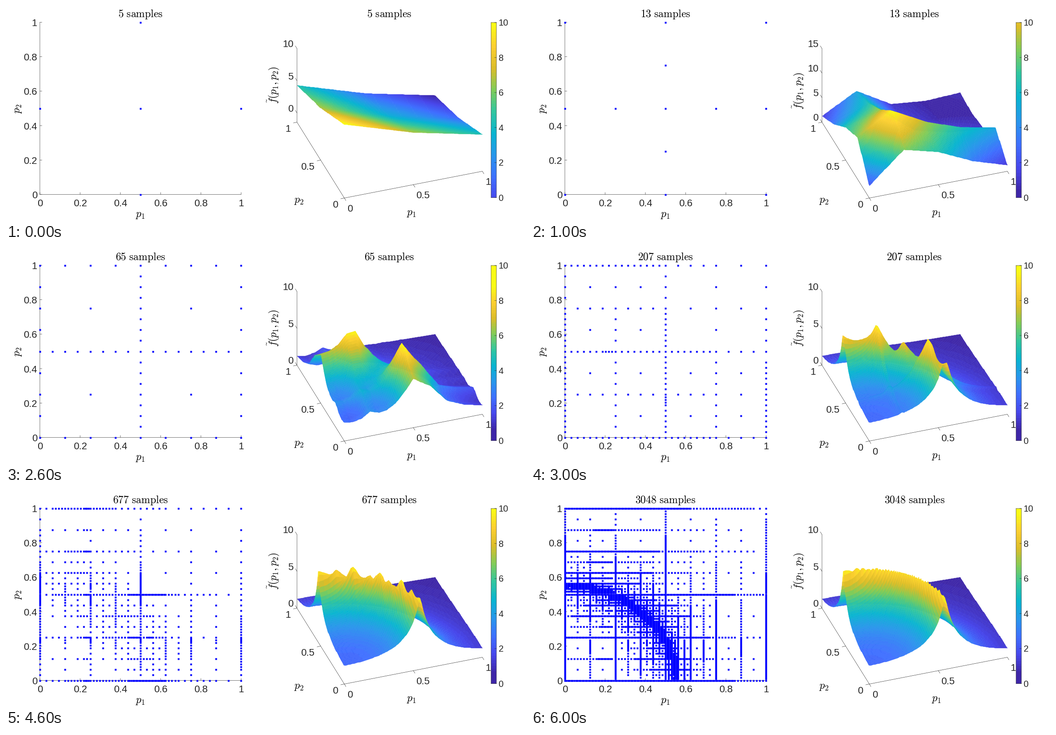
Animation of 1162 by 482 pixels, one loop 7 s. Source, as a matplotlib script:

```python
import numpy as np
import matplotlib.pyplot as plt
from matplotlib.animation import ArtistAnimation
from matplotlib.colors import LinearSegmentedColormap

W, H, DPI = 1162, 482, 64
INK = (0.15, 0.15, 0.15)
plt.rcParams["font.family"] = "Liberation Sans"
plt.rcParams["mathtext.fontset"] = "cm"

PARULA = LinearSegmentedColormap.from_list("parula", [
    (.242, .150, .660), (.280, .278, .922), (.244, .436, .999),
    (.154, .590, .922), (.030, .708, .816), (.194, .776, .625),
    (.504, .799, .348), (.863, .741, .160), (.989, .814, .189),
    (.977, .984, .081)], N=64)

# ---- adaptive sparse grid on nodes k / N ----
FINEST = 7
N = 2 ** FINEST
NODES = np.arange(N + 1)


def node_level(k):
    if k == N // 2:
        return 0
    return 1 if k % N == 0 else FINEST + 1 - (k & -k).bit_length()


def node_parent(k):
    lev = node_level(k)
    if lev < 2:
        return N // 2
    h = N >> lev
    return k - h if node_level(k - h) == lev - 1 else k + h


LEVEL = np.array([node_level(int(k)) for k in NODES])
PARENT = np.array([node_parent(int(k)) for k in NODES])


def model(x, y):
    return 1 / (np.abs(0.3 - x ** 2 - y ** 2) + 0.1)


def detail(f):
    """Along axis 0: each node's value minus its coarser interpolant."""
    out = f.copy()
    for k, lev in enumerate(LEVEL):
        if lev == 1:
            out[k] -= f[N // 2]
        elif lev > 1:
            h = N >> lev
            out[k] -= (f[k - h] + f[k + h]) / 2
    return out


def hats(x):
    h = np.maximum(0, 1 - np.abs(x[:, None] - NODES / N) * 2.0 ** LEVEL)
    h[:, LEVEL == 0] = 1
    return h


SURPLUS = detail(detail(model(NODES[:, None] / N, NODES / N)).T).T
WEIGHT = np.abs(SURPLUS)
DEPTH = LEVEL[:, None] + LEVEL


def include(used, a, b):
    """Add a node together with all of its ancestors."""
    if not used[a, b]:
        used[a, b] = True
        include(used, PARENT[a], b)
        include(used, a, PARENT[b])


def grow(used, depth, count):
    """Refine below the largest surplus until count samples are used."""
    used = used.copy()
    include(used, N // 2, N // 2)
    while used.sum() < count:
        weight = np.where(used, WEIGHT, -1)
        score = np.maximum(weight[PARENT], weight[:, PARENT])
        score[used | (DEPTH > depth)] = -2
        include(used, *np.unravel_index(score.argmax(), score.shape))
    return used


# ---- drawing, all in pixel coordinates ----
fig = plt.figure(figsize=(W / DPI, H / DPI), dpi=DPI, facecolor="white")
ax = fig.add_axes([0, 0, 1, 1])
ax.axis("off")


def pt(px):
    return px * 72 / DPI


def seg(x0, y0, x1, y1, z=1):
    return ax.plot([x0, x1], [y0, y1], color=INK, lw=pt(.65), zorder=z,
                   snap=False)[0]


def label(x, y, s, size=22, ha="center"):
    return ax.text(x, y + .36 * size, s, fontsize=pt(size), color=INK,
                   ha=ha, va="baseline")


def tex(x, y, s, va="baseline", **kw):
    return ax.text(x, y, s, fontsize=pt(23.7), color="black",
                   ha="center", va=va, **kw)


def flat(x, y):
    return 75.4 + 450.4 * x, 422 - 386 * y


def project(x, y, h=0):
    return 757 + 309 * x - 106 * y, 430 - 60 * x - 170 * y - 165 * h


def draw_axes():
    seg(*flat(0, 0), *flat(0, 1))
    seg(*flat(0, 0), *flat(1, 0))
    for v in np.linspace(0, 1, 6):
        x, y = flat(v, v)
        x0, y0 = flat(0, 0)
        seg(x, y0, x, y0 - 4.5)
        seg(x0, y, x0 + 4.5, y)
        label(x, 441, f"{v:g}")
        label(69.5, y + .5, f"{v:g}", ha="right")
    tex(300.5, 472, "$p_1$")
    tex(27, 229, "$p_2$", rotation=90, va="center")

    seg(*project(0, 0), *project(1, 0))
    seg(*project(0, 0), *project(0, 1))
    seg(*project(0, 1), *project(0, 1, 1))
    for v in (0, .5, 1):
        x, y = project(v, 0)
        seg(x, y, x + 3.5, y + 5.7)
        label(x + 13 + 34 * v * (1 - v), y + 23, f"{v:g}")
        x, y = project(0, v)
        seg(x, y, x - 8, y + 1.6)
        label(x - 14, y + 14, f"{v:g}", ha="right")
    tex(655.5, 441, "$p_2$")
    tex(907.5, 468, "$p_1$")

    for x in (1085.5, 1097.5):
        seg(x, 36.5, x, 429, 4)
    for y in (36.5, 429):
        seg(1085.5, y, 1097.5, y, 4)
    for v in range(0, 11, 2):
        y = 429 - 39.25 * v
        seg(1093.5, y, 1097.5, y, 4)
        label(1102, y, str(v), size=20, ha="left")


GRID = np.linspace(0, 1, 101)
BASIS = hats(GRID)


def scene(used):
    z = BASIS @ np.where(used, SURPLUS, 0).T @ BASIS.T
    low, top = min(0, z.min()), 15 if z.max() > 11 else 10
    span = top - low
    shade = dict(cmap=PARULA, vmin=z.min(), vmax=z.max())

    px, py = np.nonzero(used)
    dots = ax.scatter(*flat(px / N, py / N), s=pt(4) ** 2, marker="s",
                      c="#0000ff", linewidths=0, zorder=3, snap=False)

    # back to front; each cell takes the colour of its nearest corner
    back = z[::-1, ::-1]
    gx, gy = np.meshgrid(GRID[::-1], GRID[::-1])
    sx, sy = project(gx, gy, (back - low) / span)
    sheet = ax.pcolormesh(sx, sy, back[1:, 1:], edgecolors="face",
                          linewidth=pt(.4), antialiased=True, zorder=2, **shade)

    bar_x, bar_y = np.meshgrid([1085.5, 1097.5], np.linspace(429, 36.5, 257))
    bar = ax.pcolormesh(bar_x, bar_y, np.linspace(0, 10, 256)[:, None], **shade)

    parts = [dots, sheet, bar]
    for x in (300.5, 858):
        parts.append(tex(x, 25, rf"$\mathrm{{{used.sum()}\ samples}}$"))
    for v in range(0, top + 1, 5):
        x, y = project(0, 1, (v - low) / span)
        parts.append(seg(x, y, x - 3.7, y - 6))
        parts.append(label(x - 8, y - 11, str(v), ha="right"))
    name_y = 177 if top == 10 else 190
    parts.append(tex(598, name_y, r"$\tilde{f}(p_1,p_2)$", rotation=90,
                     va="center"))
    return parts


draw_axes()
used = np.zeros((N + 1, N + 1), bool)
scenes = []
for depth, count in ((1, 5), (2, 13), (4, 65), (6, 207), (9, 677),
                     (11, 1417), (14, 3048)):
    used = grow(used, depth, count)
    scenes.append(scene(used))
ax.set_xlim(-.5, W - .5)
ax.set_ylim(H - .5, -.5)

anim = ArtistAnimation(fig, scenes, interval=1000, repeat=True, repeat_delay=0)
plt.show()
```
